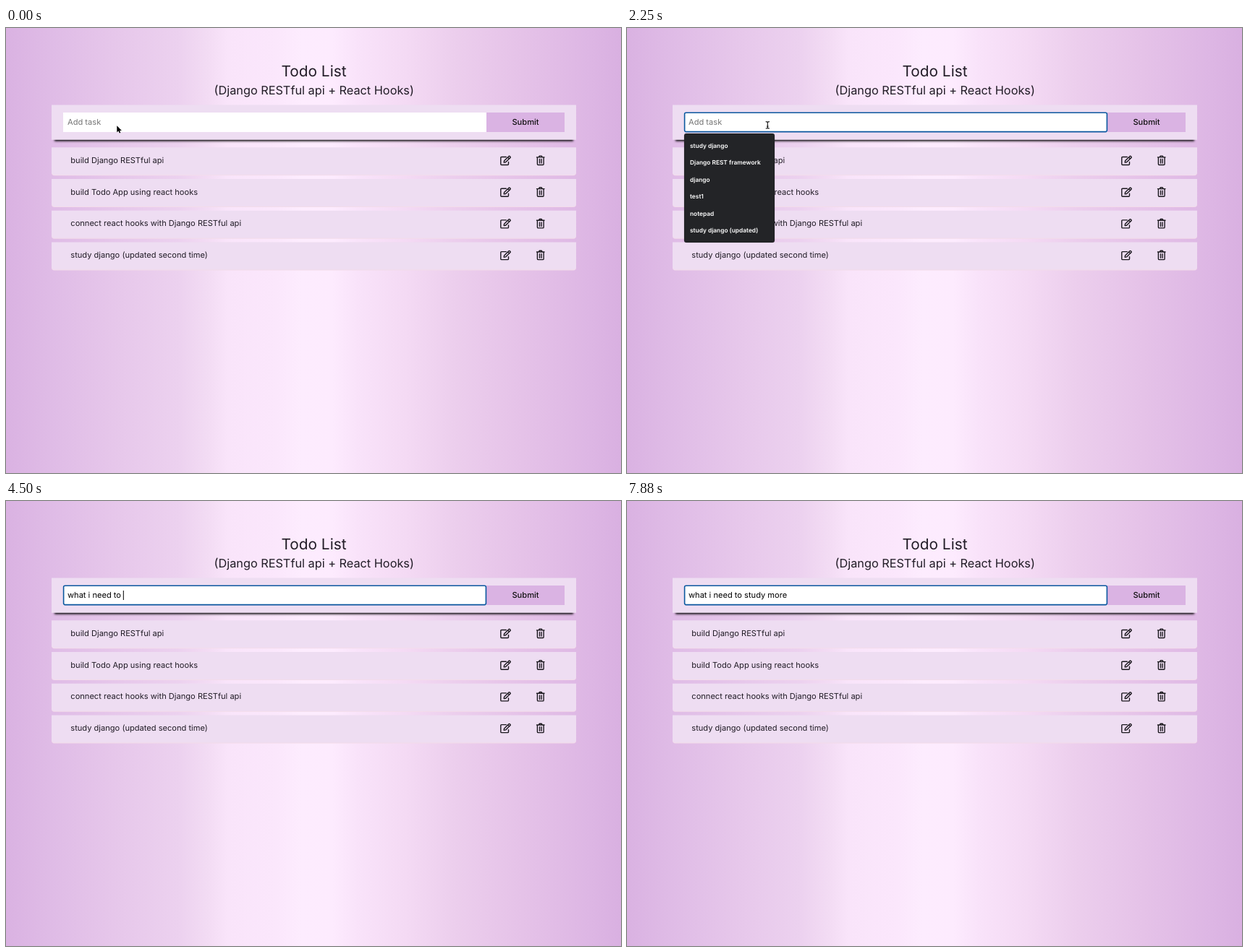
These frames come from a looping animation (850 by 616 pixels, 8000 ms). An HTML page:

```html
<!DOCTYPE html>
<html lang="en">
<head>
<meta charset="utf-8">
<title>Todo List</title>
<style>
  html, body { margin: 0; width: 100%; height: 100%; overflow: hidden; }
  body {
    background: linear-gradient(90deg, #dab2e2 0, #dfbbe6 7%, #e7c8eb 19%, #ecd1ef 28%,
      #f3dcf4 33%, #f9e4fa 36%, #fbe7fc 44%, #fdecfe 48%, #fdebfe 53%, #f9e3fa 57%,
      #f4daf4 65%, #ecceed 73%, #e5c2e8 84%, #ddb6e4 95%, #d9b0e1 100%);
  }
  svg { display: block; width: 850px; height: 616px; }
  text {
    font: 11.1px Inter, "Open Sans", sans-serif;
    font-optical-sizing: none;
    text-rendering: geometricPrecision;
    white-space: pre;
    fill: #211c26;
  }
  .mid { text-anchor: middle; }
  #title { font-size: 20.8px; }
  #subtitle { font-size: 16.3px; }
  #submit { font-weight: 500; fill: #111; }
  #entry { fill: #000; }
  #entry.hint { fill: #757575; }
  #menu text { font-size: 8.35px; font-weight: 600; fill: #fff; }
  .icon { fill: none; stroke: #1b181e; stroke-width: 1.4; stroke-linejoin: round; stroke-linecap: round; }
</style>
</head>
<body>
<svg viewBox="0 0 850 616">
  <defs>
    <filter id="soft" x="-5%" y="-100%" width="110%" height="300%"><feGaussianBlur stdDeviation="1.8"/></filter>
    <g id="edit" class="icon">
      <path d="M8.3 2.2H1.9Q.8 2.2 .8 3.3V12Q.8 13.2 1.9 13.2H10.4Q11.5 13.2 11.5 12V9.2"/>
      <path d="M5.6 7.5L11.8 1.4Q12.6 .6 13.4 1.4L13.8 1.8Q14.6 2.6 13.8 3.4L7.5 9.5L5.2 9.8ZM10.6 2.7L12.5 4.6"/>
    </g>
    <g id="bin" class="icon">
      <path d="M.5 2.6H11M3.4 2.4L4.3 .8H7.2L8.1 2.4M1.4 2.8V12Q1.4 13.2 2.5 13.2H9Q10.1 13.2 10.1 12V2.8M4.5 5.2V10.8M7 5.2V10.8"/>
    </g>
  </defs>

  <text id="title" class="mid" x="425.5" y="67.3">Todo List</text>
  <text id="subtitle" class="mid" x="425.7" y="92.3">(Django RESTful api + React Hooks)</text>

  <rect x="67" y="148" width="717" height="8.5" filter="url(#soft)"/>
  <rect x="63" y="106.5" width="725" height="48.3" fill="#eeddf2"/>
  <rect x="79" y="117" width="585" height="27" fill="#fff"/>
  <rect x="664" y="117" width="108" height="27" fill="#dab3e3"/>
  <text id="submit" class="mid" x="718" y="134">Submit</text>
  <rect id="ring" x="79.6" y="117.2" width="583.8" height="26.4" rx="2" fill="none" stroke="#0b579f" stroke-width="1.6"/>
  <text id="entry" x="85" y="134"></text>
  <rect id="caret" y="124" width="1" height="13"/>

  <g id="items"></g>
  <g id="menu"></g>

  <path id="arrow" d="M0 0V9.3L2.1 7.4L3.5 10.4L5.1 9.7L3.8 6.7H6.6Z" transform="translate(153.3 135.2)"
    stroke="#fff" stroke-width=".8" paint-order="stroke"/>
  <path id="beam" d="M-2.6 -4.7Q0 -4.7 0 -3.4Q0 -4.7 2.6 -4.7M0 -3.6V3.6M-2.6 4.7Q0 4.7 0 3.4Q0 4.7 2.6 4.7M-1.2 1.8H1.2"
    fill="none" stroke="#111" stroke-width="1.1"/>
</svg>
<script>
const LOOP = 8000, TICK = 125;
const PHRASE = "what i need to study more ";
const TASKS = ["build Django RESTful api", "build Todo App using react hooks",
  "connect react hooks with Django RESTful api", "study django (updated second time)"];

// Times below are in ticks: [from tick, letters then, last tick], one more letter per tick.
const TYPING = [[22, 1, 28], [29, 9, 29], [31, 10, 36], [43, 16, 53]];
const CARET = [[6, 10], [14, 18], [22, 39], [43, 56], [60, 63]];
const MENUS = [
  { from: 7, to: 22, width: 125, rows: ["study django", "Django REST framework", "django",
    "test1", "notepad", "study django (updated)"] },
  { from: 22, to: 24, width: 195.5, rows: ["what is django?", "why we need to learn python with django?"] },
  { from: 24, to: 28, width: 88, rows: ["what is django?"] }
];
const FOCUS = 6, MOVE_END = 5, TYPE_START = 22;

const $ = id => document.getElementById(id);
const show = (el, on) => el.setAttribute("visibility", on ? "visible" : "hidden");
const within = (n, from, to) => n >= from && n < to;

$("items").innerHTML = TASKS.map((task, i) => {
  const y = 165.3 + i * 43.7;
  const card = top => `M63 ${top}H788V${top + 34}q0 4 -4 4H67q-4 0 -4 -4Z`;
  return `<path d="${card(y + 1)}" fill="#f3dcea"/><path d="${card(y)}" fill="#eeddf2"/>
    <text x="89.3" y="${y + 21.6}">${task}</text>
    <use href="#edit" x="683" y="${y + 11}"/><use href="#bin" x="733" y="${y + 11}"/>`;
}).join("");

const menuMarkup = ({ rows, width }) =>
  `<rect x="79" y="146" width="${width}" height="${rows.length * 23.5 + 10}" rx="3"
    fill="#232427" stroke="#000" stroke-opacity=".15"/>` +
  rows.map((row, i) => `<text x="87" y="${165.7 + i * 23.5}">${row}</text>`).join("");

function lettersAt(tick) {
  let count = 0;
  for (const [from, first, last] of TYPING)
    if (tick >= from) count = first + Math.min(tick, last) - from;
  return count;
}

let drawn = -1;
function draw(tick) {
  const typed = PHRASE.slice(0, lettersAt(tick));
  const entry = $("entry");
  entry.textContent = typed || "Add task";
  entry.setAttribute("class", typed ? "" : "hint");

  show($("ring"), tick >= FOCUS);
  show($("caret"), CARET.some(([from, to]) => within(tick, from, to)));
  $("caret").setAttribute("x", 84.7 + (typed ? entry.getComputedTextLength() : 0));

  const menu = MENUS.find(m => within(tick, m.from, m.to));
  $("menu").innerHTML = menu ? menuMarkup(menu) : "";

  const p = Math.min(tick / MOVE_END, 1);
  const ease = p * p * (3 - 2 * p);
  show($("arrow"), tick === 0);
  show($("beam"), within(tick, 1, TYPE_START));
  $("beam").setAttribute("transform", `translate(${153.3 + 41 * ease} ${135.2 - 0.9 * ease})`);
}

const start = performance.now();
function frame() {
  const tick = Math.floor((performance.now() - start) % LOOP / TICK);
  if (tick !== drawn) draw(drawn = tick);
  requestAnimationFrame(frame);
}
frame();
</script>
</body>
</html>
```
